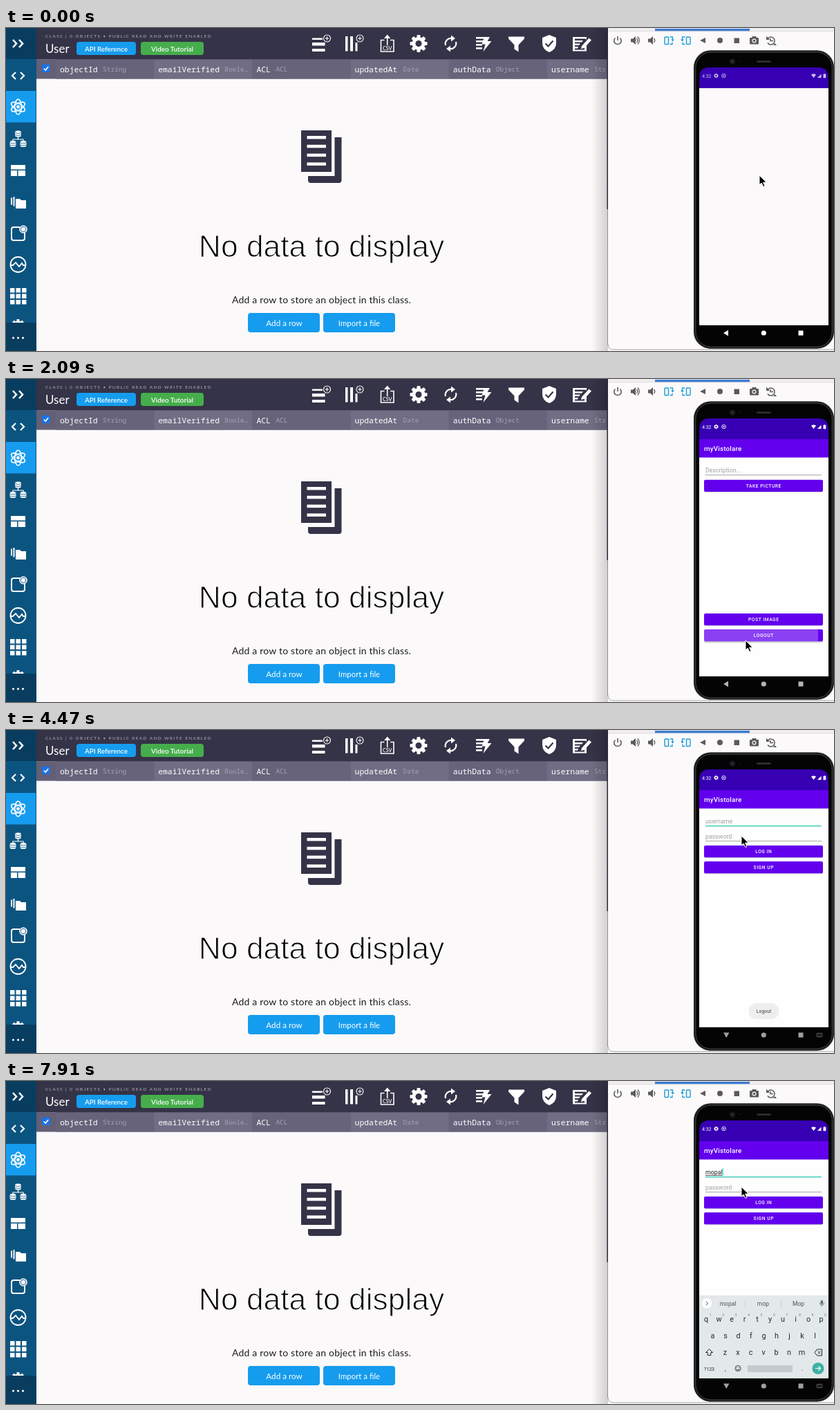
Animation of 1198x467 px, one loop 8000 ms. Source, as an HTML page:

```html
<!DOCTYPE html>
<html lang="en">
<head>
<meta charset="utf-8">
<title>Dashboard and phone</title>
<style>
html, body { margin: 0; width: 100%; height: 100%; overflow: hidden; background: #fcf9fa; }
svg { display: block; width: 1198px; height: 467px; }
.lato { font-family: Lato, sans-serif; }
.mono { font-family: "Noto Sans Mono", monospace; }
.app { font-family: Roboto, sans-serif; }
.big { font-family: "Liberation Sans", Arial, sans-serif; }
</style>
</head>
<body>
<svg id="stage" viewBox="0 0 1198 467" xmlns="http://www.w3.org/2000/svg"></svg>
<script>
const LOOP = 8000, TICK = 149.1;
const BLUE = '#169cee', DARK = '#353347', PURPLE = '#6200ee', DEEP = '#3700b3', TEAL = '#2fd3be';

// drawing helpers
const rect = (x, y, w, h, fill, r = 0, more = '') =>
  `<rect x="${x}" y="${y}" width="${w}" height="${h}" rx="${r}" fill="${fill}" ${more}/>`;
const circ = (x, y, r, fill, more = '') => `<circle cx="${x}" cy="${y}" r="${r}" fill="${fill}" ${more}/>`;
const fillPath = (d, fill, more = '') => `<path d="${d}" fill="${fill}" ${more}/>`;
const line = (d, color, w = 1, more = '') =>
  `<path d="${d}" fill="none" stroke="${color}" stroke-width="${w}" ${more}/>`;
const text = (x, y, s, size, fill, cls, more = '') =>
  `<text x="${x}" y="${y}" font-size="${size}" fill="${fill}" class="${cls}" ${more}>${s}</text>`;
const mid = (x, y, s, size, fill, cls, more = '') =>
  text(x, y, s, size, fill, cls, 'text-anchor="middle" ' + more);
const at = (x, y, body, more = '') => `<g transform="translate(${x} ${y})${more}">${body}</g>`;
const id = (name, body = '') => `<g id="${name}">${body}</g>`;
const times = (n, f) => Array.from({ length: n }, (_, i) => f(i)).join('');

const gear = (r, fill, hole) => times(8, i =>
  `<rect x="${-r * .2}" y="${-r}" width="${r * .4}" height="${r}" rx="${r * .08}" fill="${fill}" transform="rotate(${i * 45})"/>`) +
  circ(0, 0, r * .76, fill) + circ(0, 0, r * .36, hole);

function sidebar() {
  const W = '#fff', S = '#0c5480';
  const db = (x, y) => at(x, y, rect(-4.5, -4.5, 9, 9, W, 3) + line('M-4.5 -1.5Q0 .5 4.5 -1.5M-4.5 1.5Q0 3.5 4.5 1.5', S, .8));
  return rect(0, 0, 44, 467, S) + rect(0, 0, 44, 45, '#083d5f') + rect(0, 91, 43, 45.5, BLUE) +
    line('M10 17l5 5.5l-5 5.5M19 17l5 5.5l-5 5.5', W, 2.6) +
    line('M14 64l-5 5l5 5M21 64l5 5l-5 5', W, 2.2) +
    at(17.5, 114, [0, 60, 120].map(a =>
      `<ellipse rx="11" ry="4.8" fill="none" stroke="#fff" stroke-width="1.6" transform="rotate(${a + 30})"/>`).join('') + circ(0, 0, 2.4, W)) +
    db(17.5, 153) + db(10, 167.5) + db(25, 167.5) + line('M17.5 157v4M10 164v-3h15v3', W, 1.2) +
    rect(7, 198, 21, 6.5, W) + rect(7, 206, 9, 8, W) + rect(17.5, 206, 10.5, 8, W) +
    line('M8 245.500v10M11.500 244v13.500', W, 2) + fillPath('M14 247h6l2 2h7v12H14z', W) +
    line('M20 288h-9a3 3 0 0 0-3 3v13a3 3 0 0 0 3 3h13a3 3 0 0 0 3-3v-8', W, 2) + circ(25, 291, 5.8, W) +
    circ(25, 291, 3.8, 'none', `stroke="${S}" stroke-width=".9"`) +
    circ(17.5, 342, 11, 'none', 'stroke="#fff" stroke-width="1.8"') +
    line('M7 343h3l4-4l5 6l4-5l2 3h3', W, 1.8) +
    times(9, i => rect(6 + i % 3 * 8.5, 376 + Math.floor(i / 3) * 8.5, 6.5, 6.5, W)) +
    at(17.5, 431, gear(10, W, S)) + rect(0, 426, 44, 41, '#083d5f') +
    times(3, i => circ(10.5 + i * 7, 448, 1.6, W));
}

function toolbar() {
  const W = '#fff';
  const plus = (x, y) => circ(x, y, 5, DARK, 'stroke="#fff" stroke-width="1.1"') +
    line(`M${x - 2.8} ${y}h5.6M${x} ${y - 2.8}v5.6`, W, 1.1);
  return rect(44, 0, 827, 45.5, DARK) +
    text(57, 14, 'CLASS | 0 OBJECTS • PUBLIC READ AND WRITE ENABLED', 6.3, '#b5b3c0', 'lato', 'letter-spacing="1.48"') +
    text(57, 36, 'User', 17, W, 'lato') +
    rect(102, 20, 86, 19, BLUE, 4) + mid(145, 34, 'API Reference', 9.9, W, 'lato', 'font-weight="600"') +
    rect(195, 20, 91, 19, '#46ad4c', 4) + mid(240.5, 34, 'Video Tutorial', 9.9, W, 'lato', 'font-weight="600"') +
    rect(443, 14.5, 15, 2.5, W) + rect(443, 21, 18.5, 4.5, W) + rect(443, 30, 18.5, 4, W) + plus(464.5, 15) +
    rect(491, 12, 3.5, 21.5, W) + rect(498, 12, 4, 21.5, W) + rect(505.500, 21, 3, 12.5, W) + plus(512, 15) +
    line('M547.500 17.500h-5v16.500h18.500V17.500h-5M551.700 25V13', W, 1.6) + fillPath('M547 15l4.700-5.500l4.700 5.500z', W) +
    mid(551.7, 31.8, 'CSV', 7.2, W, 'lato', 'font-weight="600"') +
    at(597, 22.5, gear(12.5, W, DARK)) +
    line('M636 25a8 8 0 0 1 9-10M651 20a8 8 0 0 1-9 10', W, 2.2) + fillPath('M644 10.500l6 4.500l-6 4.500zM643 25.500l-6 4.500l6 4.500z', W) +
    times(4, i => rect(680, 13 + i * 5, i > 1 ? 9 : 12, 2.6, W)) + fillPath('M692 13h8l-3.500 6h6l-12 15l3-10.500h-5z', W) +
    fillPath('M727 12.500h23v3l-8.500 9v10l-6-4V24.500L727 15.500z', W) +
    fillPath('M786 10l10 4v8q0 9-10 13q-10-4-10-13v-8z', W) + line('M780.500 22.500l4 4l7-8', DARK, 2.2) +
    fillPath('M820 13h20v3.500l-2-1l-15 0v2.500h12l-2 2.500h-10v2h8l-2 2.500h-6v2h5l-1 2.500h-4v2h14v-5l3-3v10h-20z', W) +
    fillPath('M833 26l10.500-11.500l3.500 3l-10.500 11.500l-4.500 1z', W);
}

function table() {
  const cols = [['objectId', 'String', 62], ['emailVerified', 'Boole…', 96], ['ACL', 'ACL', 28],
    ['updatedAt', 'Date', 70], ['authData', 'Object', 62], ['username', 'Str', 62]];
  return rect(44, 45.5, 827, 28, '#625f77') + cols.map(([name, type, dx], i) => {
    const x = 72 + i * 142.2;
    return rect(x, 45.5, 142.2, 28, i % 2 ? '#706d84' : '#66637b') +
      text(x + 6, 64, name, 11.4, '#fff', 'mono') + text(x + 6 + dx, 63, type, 9.5, '#a6a3b5', 'mono');
  }).join('') + rect(52, 52.5, 11.5, 11.5, '#1a73e8', 2) + line('M54.700 58.500l2.500 2.500l4-5', '#fff', 1.6);
}

function empty() {
  return rect(44, 73.5, 827, 394, '#fcf9fa') +
    fillPath('M475.500 158h10v62q0 4-4 4H441q-4 0-4-4v-6h38.500z', DARK) + rect(427, 148, 44, 60, DARK) +
    times(4, i => rect(435.5, 156 + i * 12.8, 27.5, 4.5, '#fcf9fa')) +
    mid(456.5, 331, 'No data to display', 44.4, '#000', 'big', 'stroke="#fcf9fa" stroke-width="1.2"') +
    mid(456.5, 397.500, 'Add a row to store an object in this class.', 14, '#1c1c1c', 'lato', 'letter-spacing=".2"') +
    rect(350, 412, 104, 28, BLUE, 4) + mid(402.5, 430.5, 'Add a row', 11.7, '#fff', 'lato') +
    rect(459, 412, 104, 28, BLUE, 4) + mid(511, 430.5, 'Import a file', 11.4, '#fff', 'lato');
}

function emulator() {
  const G = '#5b5b5e', C = '#1b9bd8';
  const speaker = x => fillPath(`M${x - 5} 15.500h3l4-3.500v12l-4-3.500h-3z`, G);
  const turn = (x, s) => at(x, 18, rect(-6, -5, 5.5, 10.5, 'none', 1, `stroke="${C}" stroke-width="1.4"`) +
    line('M1.500 -5h4v4M1.500 5.500h3.500v-3', C, 1.3) + fillPath('M3 -1.500h5l-2.500 3z', C), ` scale(${s} 1)`);
  return fillPath('M871 0H1198V465H879q-8 0-8-8z', '#fcf9fa') + line('M871 457q0 8 8 8h319', '#a5a3a6', 1) +
    rect(869.5, 0, 1.5, 262, '#29283a') + rect(870, 262, 1, 196, '#908e94') +
    rect(871, 0, 327, 4.5, '#f0edef') + rect(939, 1, 137, 3.5, '#3b7bd0') + rect(871, 4.5, 327, .7, '#d4d1d4') +
    line('M881.500 14.500a5.200 5.200 0 1 0 7 0M885 12v6', G, 1.6) +
    speaker(909) + line('M912.500 15q2.500 3 0 6M914 12.500q4.500 5.500 0 11', G, 1.3) +
    speaker(934) + line('M937.500 15q2.500 3 0 6', G, 1.3) + turn(959, 1) + turn(984, -1) +
    fillPath('M1004 18l8-4v8z', G) + circ(1033, 18, 4, G) + rect(1053.500, 14.500, 7.500, 7.500, G) +
    rect(1076, 14, 13, 9.500, G, 1) + rect(1079.500, 12, 6, 3, G) + circ(1082.500, 18.500, 3, '#fcf9fa') + circ(1082.500, 18.500, 1.8, G) +
    line('M1102 15.500a5.500 5.500 0 1 1 0 6M1106 15v3.500h4', G, 1.5) + fillPath('M1100 11.500v5.500h5z', G) + fillPath('M1110 25h5l-2.500-3z', G) +
    rect(1196, 190, 2, 27, '#111') +
    rect(995.5, 32.8, 202, 430.4, '#0a0a0b', 24, 'stroke="#3a3a3c" stroke-width="1.2"') +
    rect(997.8, 35, 197.5, 426, '#040405', 22, 'stroke="#59595c" stroke-width=".9"') +
    circ(1051, 48.5, 4.2, '#17181c') + circ(1051, 48.5, 2, '#2b2d33') + circ(1063, 48.5, 1, '#222') +
    rect(1086, 47, 21, 3, '#2b2b2d', 1.5);
}

// phone screens
const button = (y, label) => rect(1010, y + .8, 172, 17.5, '#000', 2, 'opacity=".16"') + rect(1010, y, 172, 17.3, PURPLE, 2) +
  mid(1096.3, y + 11, label, 6.7, '#fff', 'app', 'font-weight="500" letter-spacing=".55"');
const bar = rect(1003, 87, 187, 26.5, PURPLE) + text(1010, 104.300, 'myVistolare', 9.9, '#fff', 'app', 'font-weight="500" letter-spacing=".15"');
const hint = (y, s) => text(1012, y, s, 8.8, '#a3a1a3', 'app');
const rule = y => rect(1012, y, 168, .9, '#9c9a9c');
const page = '#fefefe';

const home = rect(1003, 87, 187, 343, page) + bar + hint(135, 'Description...') + rule(138.4) +
  button(145.8, 'TAKE PICTURE') + button(339, 'POST IMAGE') + button(362, 'LOGOUT');
const login = rect(1003, 57, 187, 30, DEEP) + rect(1003, 87, 187, 343, page) + bar + id('name', hint(135, 'username')) + rule(138.4) +
  rect(1012, 138, 168, 1.2, TEAL, 0, 'id="focus"') + hint(156.700, 'password') + rule(160.2) + button(167, 'LOG IN') + button(190, 'SIGN UP');

function keyboard() {
  const K = '#24282b', g = '#5f6669';
  const row = (s, x, y) => [...s].map((c, i) => mid(x + i * 18.5, y, c, 10.8, K, 'app')).join('');
  return rect(1003, 310, 187, 121, '#e3e8eb') +
    row('qwertyuiop', 1013, 347.500) + times(10, i => mid(1019 + i * 18.5, 340, (i + 1) % 10, 4.5, '#666d70', 'app')) +
    row('asdfghjkl', 1022.5, 371.5) + row('zxcvbnm', 1040.5, 395.500) +
    line('M1017.500 387.500l-5 5h2.700v4h4.600v-4h2.700z', K, 1) +
    line('M1170 392.500l3.500-4.500h7v9h-7zM1174.500 390.500l4 4M1178.500 390.500l-4 4', K, 1) +
    mid(1017.500, 418.5, '?123', 7, K, 'app') + mid(1041, 418.5, ',', 9, K, 'app') + mid(1152, 418.5, '.', 9, K, 'app') +
    circ(1059, 415.500, 4, 'none', `stroke="${K}" stroke-width=".9"`) + circ(1057.500, 414.500, .6, K) + circ(1060.500, 414.500, .6, K) +
    line('M1056.700 416.700q2.300 2.500 4.600 0', K, .9) +
    rect(1073, 411, 65, 10, '#c4cacd', 1) + circ(1175, 415.500, 8.6, '#3fb1a4') +
    line('M1171 415.500h7.500M1175.500 412.500l3 3l-3 3', '#fff', 1.1) +
    circ(1014, 321.500, 7.300, '#fff') + id('chev') +
    rect(1178.800, 317, 3.2, 5.500, g, 1.6) + line('M1177.500 320.500q0 3.500 3 3.500q3 0 3-3.500M1180.500 324v2', g, .9) +
    id('tools', circ(1038, 320.500, 2.6, 'none', `stroke="${g}" stroke-width="1.1"`) + line('M1040 322.500l3 3', g, 1.2) +
      line('M1070 320v5h-8v-8h8v3M1064 321q2 2.500 4 0', g, 1) +
      mid(1092.500, 324, 'GIF', 6.3, g, 'app', 'font-weight="700"') +
      rect(1116.500, 317, 6, 6, g, 1) + rect(1119.500, 319.500, 5.500, 6, '#e3e8eb', 1, `stroke="${g}" stroke-width=".9"`) +
      times(3, i => circ(1151 + i * 3, 321, .9, g))) +
    id('words');
}

const toast = rect(1074.500, 395, 44, 23, '#eeeeef', 11.5) + mid(1096.500, 409, 'Logout', 6.7, '#3c3c3e', 'app', 'letter-spacing=".1"');
const status = text(1007, 71.700, '4:32', 7, '#fff', 'app') + at(1027.500, 69, gear(3.2, '#fff', DEEP)) +
  circ(1038.500, 69, 2.8, 'none', 'stroke="#fff" stroke-width=".9"') + circ(1038.500, 69, 1.1, '#fff') +
  fillPath('M1165 67.500q3.500-2.500 7 0l-3.500 4.500zM1174 72h5.500v-5.500zM1182.500 66.800h1v-.8h1.800v.8h1v5.400h-3.800z', '#fff');
const pointer = 'M0 0V14L3.200 11L5.700 16.500L8 15.500L5.600 10.200H10.200z';

const stage = document.getElementById('stage');
stage.innerHTML = `<defs><clipPath id="view"><path d="M1003 429.700V72q0-15 15-15H1175q15 0 15 15V429.700z"/></clipPath>
  <linearGradient id="shade"><stop offset="0" stop-color="#000" stop-opacity="0"/><stop offset=".4" stop-color="#000" stop-opacity=".07"/>
  <stop offset="1" stop-color="#000" stop-opacity=".17"/></linearGradient></defs>` +
  empty() + table() + toolbar() + sidebar() + rect(847, 0, 24, 467, 'url(#shade)') + emulator() +
  `<g clip-path="url(#view)">` + id('under', rect(1003, 57, 187, 30, DEEP) + rect(1003, 87, 187, 344, '#fcf9fa') + id('home', home) +
    id('ripple', rect(1010, 362, 165, 17.300, '#fff', 2, 'opacity=".25"') + rect(1010, 379.5, 172, 2, '#000', 1, 'opacity=".15"'))) +
  id('login', login) + id('status', status) + id('caret', rect(0, 126, 1.1, 11, TEAL)) + id('keys', keyboard()) + id('toast', toast) + '</g>' +
  id('nav', id('back') + circ(1096.300, 441, 3.6, '#fff') + rect(1146.500, 437.500, 7, 7, '#fff')) +
  id('board', rect(1173, 438.500, 8, 5, 'none', 1, 'stroke="#777" stroke-width=".8"') + line('M1174.500 440.300h5M1174.500 442h5', '#777', .8, 'stroke-dasharray="1 .8"')) +
  id('mouse', fillPath(pointer, '#000', 'stroke="#fff" stroke-width="1" stroke-linejoin="round"'));

const $ = {};
stage.querySelectorAll('[id]').forEach(e => $[e.id] = e);
const set = (name, key, value) => $[name].setAttribute(key, value);
const fade = (name, v) => set(name, 'opacity', v);

// value at time t from rows of [time, ...values]
function track(rows, t) {
  const i = rows.findIndex(r => r[0] > t);
  if (i < 0) return rows[rows.length - 1].slice(1);
  if (!i) return rows[0].slice(1);
  const a = rows[i - 1], b = rows[i], p = (t - a[0]) / (b[0] - a[0]);
  return a.slice(1).map((v, k) => v + (b[k + 1] - v) * p);
}
const last = (rows, t) => rows.filter(r => r[0] <= t).pop();

const mousePath = [[1200, 1090, 213], [1340, 1089, 222], [1490, 1084, 285], [1640, 1074, 355], [1790, 1070, 378], [2390, 1070, 378], [2680, 1074, 374],
  [2830, 1074, 350], [2980, 1071, 285], [3130, 1067, 226], [3280, 1050, 165], [3430, 1030, 134], [3580, 1025, 129], [4020, 1025, 129], [4320, 1058, 149], [4470, 1064, 153]];
const homeIn = [[300, 0], [450, .4], [600, .81], [750, .95], [890, 1]];
const loginIn = [[2390, .9, 0], [2530, .955, .7], [2680, .985, 1], [2830, .997, 1], [2980, 1, 1]];
const toastIn = [[2390, 0], [2530, .4], [2680, .88], [2830, 1], [5670, 1], [5820, .65], [5970, .3], [6120, 0]];
const navDim = [[1190, 1], [1340, .9], [1790, .7], [4020, .7], [4470, .62]];
const typed = [[0, ''], [5200, 'mo'], [5350, 'mop'], [7300, 'mopa'], [7890, 'mopal']];
const offers = [[0], [5350, 'mop', 'Mop', 'mops'], [7000, 'mop', 'mops', 'Mop'], [7300, 'mopa', 'mop', 'mopeding'], [7890, 'mopal', 'mop', 'Mop']];
const caretOn = [[0, 0], [4900, 1], [5800, 0], [6400, 1], [6850, 0], [7300, 1]];

let shown = null;
function showText(word, list) {
  const key = word + list;
  if (key === shown) return;
  shown = key;
  $.name.innerHTML = word ? text(1012, 135, word, 8.8, '#222', 'app') : hint(135, 'username');
  const w = word ? $.name.firstChild.getComputedTextLength() : 0;
  if (word) $.name.innerHTML += rect(1012, 136.2, w, .8, '#333');
  set('caret', 'transform', `translate(${1012 + w} 0)`);
  $.words.innerHTML = list.slice(1).map((s, i) => mid(1044.500 + i * 51, 324.700, s, 8.6, '#50575a', 'app')).join('') +
    (list.length > 1 ? rect(1069, 317, .7, 10, '#c3c9cc') + rect(1121, 317, .7, 10, '#c3c9cc') : '');
  fade('tools', list.length > 1 ? 0 : 1);
  $.chev.innerHTML = line(list.length > 1 ? 'M1012.800 318.800l2.700 2.700l-2.700 2.700' : 'M1015.200 318.800l-2.700 2.700l2.700 2.700', '#4b5255', 1);
}

function draw(ms) {
  const t = Math.floor((ms % LOOP) / TICK + .06) * TICK + 2;
  const [mx, my] = track(mousePath, t);
  set('mouse', 'transform', `translate(${mx} ${my})`);
  fade('home', track(homeIn, t)[0]);
  fade('status', t < 140 ? .75 : 1);
  fade('ripple', t > 2080 && t < 2380 ? 1 : 0);
  fade('under', t > 2670 ? 0 : 1);
  const [scale, alpha] = track(loginIn, t);
  set('login', 'transform', `translate(1096.500 257) scale(${scale}) translate(-1096.500 -257)`);
  fade('login', alpha);
  fade('focus', t > 4000 ? 1 : 0);
  fade('toast', track(toastIn, t)[0]);
  const up = track([[4770, 121], [4920, 55], [5070, 0]], t)[0];
  set('keys', 'transform', `translate(0 ${up})`);
  const open = t > 4300;
  $.back.innerHTML = fillPath(open ? 'M1038 437.500h8.500l-4.250 7.500z' : 'M1038 441l7-4.200v8.400z', '#fff');
  fade('nav', track(navDim, t)[0]);
  fade('board', open ? 1 : 0);
  showText(last(typed, t)[1], last(offers, t));
  fade('caret', last(caretOn, t)[1]);
}

const start = performance.now();
function frame() {
  draw(performance.now() - start);
  requestAnimationFrame(frame);
}
draw(0);
requestAnimationFrame(frame);
</script>
</body>
</html>
```
